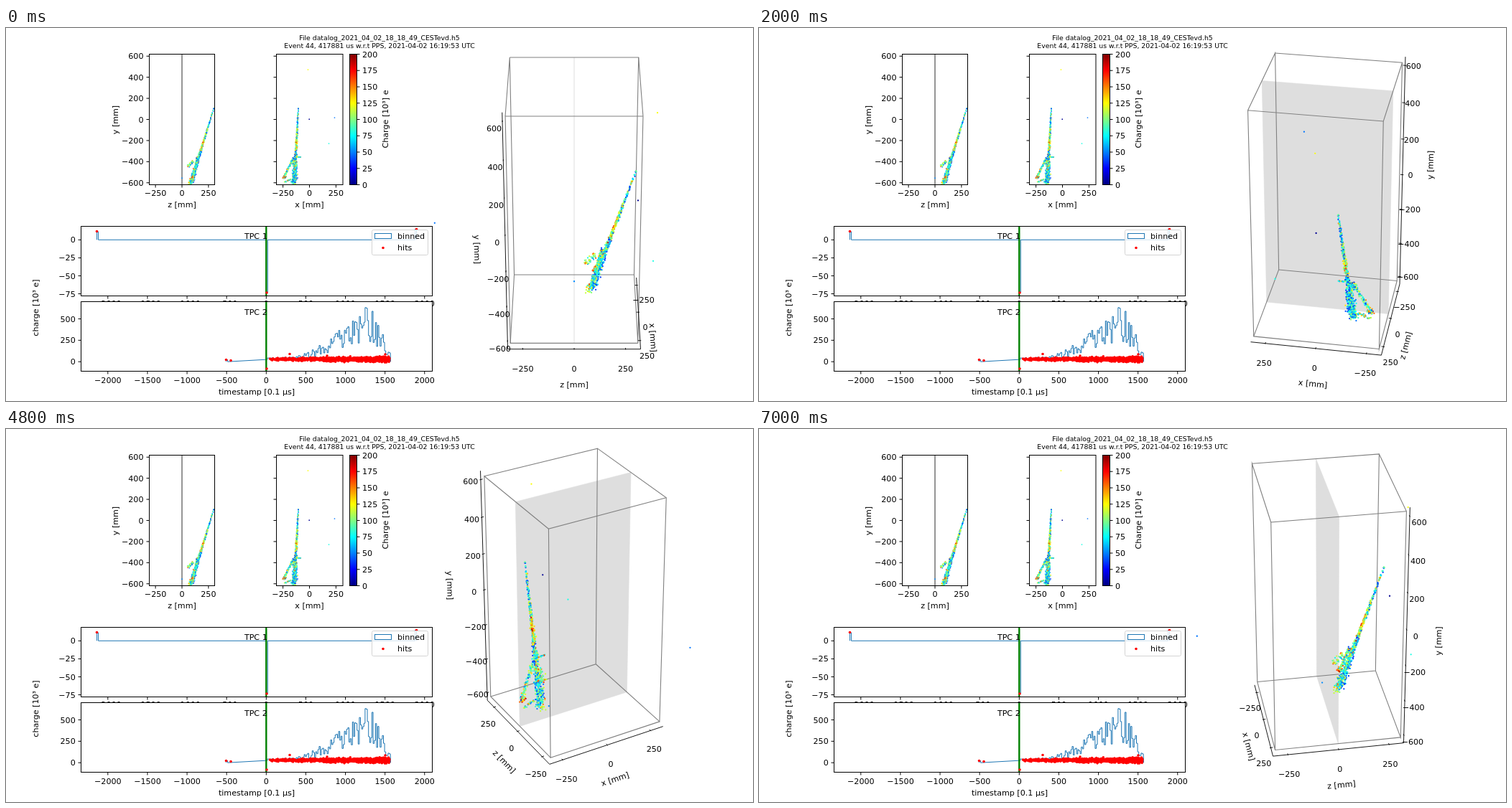
These frames come from a looping animation (1040 px wide and 520 px high, 7200 ms). An HTML page with a canvas:

```html
<!DOCTYPE html>
<html lang="en">
<head>
<meta charset="utf-8">
<title>Event display</title>
<style>
html, body { margin: 0; width: 100%; height: 100%; overflow: hidden; background: #fff; }
canvas { display: block; }
</style>
</head>
<body>
<canvas id="stage" width="1040" height="520"></canvas>
<script>
const stage = document.getElementById('stage');
let c = stage.getContext('2d');
const BLUE = '#1f77b4', GREY = '#808080';

let seed = 44;
const rnd = () => {
  seed = (Math.imul(seed, 1664525) + 1013904223) >>> 0;
  return seed / 4294967296;
};
const gauss = () => (rnd() + rnd() + rnd() - 1.5) * 2;
const clamp = (v, lo, hi) => Math.max(lo, Math.min(hi, v));
const mix = (a, b, u) => a + (b - a) * u;
const bell = (v, mid, width) => Math.exp(-(((v - mid) / width) ** 2));

function jet(t) {
  const ch = k => Math.round(255 * clamp(1.5 - Math.abs(4 * t - k), 0, 1));
  return `rgb(${ch(3)},${ch(2)},${ch(1)})`;
}

// Drawing helpers
function path(pts, color, width = 1, fill) {
  c.beginPath();
  pts.forEach(p => c.lineTo(p[0], p[1]));
  if (fill) { c.closePath(); c.fillStyle = fill; c.fill(); }
  c.strokeStyle = color;
  c.lineWidth = width;
  c.stroke();
}
const line = (x1, y1, x2, y2, color = '#000', width = 1) => path([[x1, y1], [x2, y2]], color, width);
function frame(x, y, w, h, color = '#000') {
  c.strokeStyle = color;
  c.lineWidth = 1;
  c.strokeRect(x, y, w, h);
}
function dot(x, y, r, color) {
  c.fillStyle = color;
  c.beginPath();
  c.arc(x, y, r, 0, 7);
  c.fill();
}
function text(s, x, y, align = 'center', size = 11.11, deg = 0) {
  c.save();
  c.translate(x, y);
  c.rotate(-deg * Math.PI / 180);
  c.font = `${size}px "DejaVu Sans", sans-serif`;
  c.textAlign = align;
  c.fillStyle = '#000';
  c.fillText(s, 0, size * 0.365);
  c.restore();
}
const upright = (s, x, y) => text(s, x, y, 'center', 11.11, 90);
const num = v => String(v).replace('-', '\u2212');
function range(from, to, step, fn) {
  for (let v = from; v <= to; v += step) fn(v);
}

// Hits in mm: [x, z, y], each with a colour for its charge
const hits = [];
const addHit = (x, z, y, charge) => hits.push({ pos: [x, z, y], color: jet(charge) });

function strand(from, to, count, spread, charge, growth = 1) {
  for (let i = 0; i < count; i++) {
    const u = rnd() ** growth;
    const s = typeof spread === 'function' ? spread(u) : spread;
    const [x, z, y] = from.map((v, m) => mix(v, to[m], u));
    const side = gauss();
    const q = charge + .22 * bell(u, .46, .1) * (growth < 1) - side * .06 + gauss() * .15;
    addHit(x + gauss() * s, z + side * s * .8, Math.max(-618, y + gauss() * s * .6), clamp(q, .19, .97));
  }
}
strand([-103, 307, 128], [-146, 80, -612], 680, u => 2 + 11 * u * u, .38, .55);
strand([-150, 143, -365], [-245, 106, -555], 90, 5, .45);
strand([-225, 108, -540], [-240, 104, -555], 26, 8, .65);
strand([-232, 100, -592], [-185, 95, -570], 22, 5, .5);
strand([-128, 145, -355], [-84, 150, -357], 16, 2, .55);
strand([-140, 105, -395], [-140, 62, -440], 36, 9, .5);
addHit(-14, 392, 472, .62);
addHit(-2, 309, 2, .02);
addHit(237, -657, 17, .24);
addHit(183, 380, -228, .4);
addHit(-145, 0, -555, .26);

function sidePanel(x, w, mid, axis, label) {
  c.save();
  c.beginPath();
  c.rect(x, 36.5, w, 182);
  c.clip();
  if (axis) line(mid, 36, mid, 219, GREY, 1.67);
  for (const { pos, color } of hits) dot(mid + pos[axis] * .1476, 127.5 - pos[2] * .1471, .85, color);
  c.restore();
  frame(x, 36.5, w, 182);
  range(-600, 600, 200, v => {
    const y = 127.5 - v * .1471;
    line(x - 4, y, x, y);
    if (axis) text(num(v), x - 8, y, 'right');
  });
  range(-250, 250, 250, v => {
    const tx = mid + v * .1476;
    line(tx, 218.5, tx, 222.5);
    text(num(v), tx, 230.3);
  });
  text(label, mid, 246);
}

function colorBar() {
  const g = c.createLinearGradient(0, 218.5, 0, 36.5);
  range(0, 32, 1, i => g.addColorStop(i / 32, jet(i / 32)));
  c.fillStyle = g;
  c.fillRect(478.5, 36.5, 10, 182);
  frame(478.5, 36.5, 10, 182);
  range(0, 200, 25, v => {
    const y = 218.5 - v * .91;
    line(488.5, y, 492.5, y);
    text(num(v), 496, y, 'left');
  });
  upright('Charge [10\u00b3] e', 528, 127);
}

// Charge against time: one plot above the other
const LEFT = 104.5, WIDTH = 489, HEIGHT = 97, ZERO = 362.3;
const redDot = (x, y) => dot(x, y, 1.8, '#f00');

function timeTicks(y, labelY) {
  range(-2000, 2000, 500, v => {
    const x = ZERO + v * .11025;
    line(x, y, x, y + 4);
    text(num(v), x, labelY);
  });
}
function chargeTicks(from, to, step, y0, scale) {
  range(from, to, step, v => {
    const y = y0 - v * scale;
    line(LEFT - 4, y, LEFT, y);
    text(num(v), LEFT - 7.8, y, 'right');
  });
}
const bin = (x, w, y, base) => [[x, base], [x, y], [x + w, y], [x + w, base]];

function upperPlot() {
  const base = 295.3;
  timeTicks(373.5, 384);
  chargeTicks(-75, 0, 25, base, 1.003);
  path([...bin(126.5, 2, 284, base), ...bin(ZERO, 2, 368.5, base), ...bin(569.5, 2, 280.5, base)], BLUE);
  line(ZERO, 277, ZERO, 373, '#008000', 2.4);
  redDot(126.5, 283.5);
  redDot(363, 369);
  redDot(571.5, 280.5);
  frame(LEFT, 276.5, WIDTH, HEIGHT);
  text('TPC 1', 347.8, 289.7);
}

function legend() {
  c.beginPath();
  c.roundRect(509.5, 281.5, 78, 35, 2.2);
  c.fillStyle = 'rgba(255,255,255,.8)';
  c.strokeStyle = '#d4d4d4';
  c.fill();
  c.stroke();
  frame(513.5, 286.5, 23, 7, BLUE);
  text('binned', 545, 290.3, 'left');
  redDot(525, 306.5);
  text('hits', 545, 306.3, 'left');
}

function lowerPlot() {
  const base = 465.2;
  c.fillStyle = '#fff';
  c.fillRect(LEFT, 381.5, WIDTH, HEIGHT);
  timeTicks(478.5, 490.6);
  chargeTicks(0, 500, 250, base, .1195);
  const steps = bin(306.5, 2, 462.5, base);
  range(ZERO, 534, 1.6, x => {
    const level = 5 + 72 * bell(x, 504, x < 504 ? 58 : 23);
    const y = base - level * (.35 + .65 * rnd());
    steps.push([x, y], [x + 1.6, y]);
  });
  steps.push([535.5, base]);
  path(steps, BLUE);
  line(ZERO, 382, ZERO, 478, '#008000', 2.4);
  redDot(306.5, 462.5);
  redDot(313, 463.5);
  redDot(363, 475);
  redDot(395, 454.5);
  redDot(447, 457);
  redDot(528, 455);
  for (let i = 0; i < 700; i++) {
    const u = rnd() ** .6;
    redDot(365 + 169 * u, 461.8 + gauss() * (.8 + u));
  }
  frame(LEFT, 381.5, WIDTH, HEIGHT);
  text('TPC 2', 347.8, 395.7);
  text('timestamp [0.1 \u03bcs]', 349, 507.3);
  upright('charge [10\u00b3 e]', 41, 390);
}

function drawStatic() {
  c.fillStyle = '#fff';
  c.fillRect(0, 0, 1040, 520);
  text('File datalog_2021_04_02_18_18_49_CESTevd.h5', 520, 14, 'center', 9.32);
  text('Event 44, 417881 us w.r.t PPS, 2021-04-02 16:19:53 UTC', 520, 25, 'center', 9.32);
  sidePanel(199.5, 91, 245, 1, 'z [mm]');
  sidePanel(376.5, 92.5, 422.5, 0, 'x [mm]');
  upright('y [mm]', 152, 128);
  colorBar();
  upperPlot();
  legend();
  lowerPlot();
}

// Rotating view; points are [x, z, y] with y upwards, seen from 30 degrees above
const half = [310, 310, 620];
const delta = half.map(v => v / 6);
const names = ['x [mm]', 'z [mm]', 'y [mm]'];
let cos = 1, sin = 0;

function project([x, z, y]) {
  const k = .37345 / 310;
  const side = (z * cos - x * sin) * k, near = (x * cos + z * sin) * k, up = y * k;
  const depth = 10 - near * .866 - up * .5;
  return [791 + 2390 * side / depth, 241.2 - 2390 * (up * .866 - near * .5) / depth, depth];
}

function drawAxis(i) {
  const vertical = i === 2;
  const high = [cos < -1e-9, sin < -1e-9, false];
  const edge = half.map((v, m) => (high[m] ? 1 : -1) * v * 25 / 24);
  const across = i === 0 ? 1 : 0;
  edge[across] *= -1;
  const at = (v, shift = 0) => {
    const p = edge.slice();
    p[i] = v;
    p[across] += shift;
    return p;
  };
  const outward = (v, k) => project(at(v).map((w, m) => m === i ? w : w + Math.sign(w) * k * delta[m]));

  const a = project(edge), b = project(at(-edge[i]));
  path([a, b], '#000', .9);
  const top = vertical ? 600 : 250;
  const unit = (high[across] ? 1 : -1) * delta[across];
  range(-top, top, vertical ? 200 : 250, v => {
    path([project(at(v, .2 * unit)), project(at(v, -.1 * unit))], '#000', .9);
    const p = outward(v, .69);
    text(num(v), p[0], p[1] + 4.4);
  });
  let deg = (Math.atan2(a[1] - b[1], b[0] - a[0]) * 180 / Math.PI + 180) % 180;
  if (deg > 90) deg -= 180;
  const p = outward(0, vertical ? 2.4 : 1.5);
  text(names[i], p[0], p[1], 'center', 11.11, deg);
}

function drawView(angle) {
  cos = Math.cos(angle);
  sin = Math.sin(angle);
  const corners = [[-1, -1], [1, -1], [1, 1], [-1, 1]];
  const plane = corners.map(([x, y]) => project([x * 310, 0, y * 620]));
  path(plane, '#dedede', .6, '#dedede');
  const [low, high] = [-620, 620].map(y => corners.map(([x, z]) => project([x * 310, z * 310, y])));
  for (let i = 0; i < 4; i++) {
    const next = (i + 1) % 4;
    path([low[next], low[i], high[i], high[next]], GREY, 1.1);
  }
  names.forEach((_, i) => drawAxis(i));
  hits.map(h => [...project(h.pos), h.color])
    .sort((a, b) => b[2] - a[2])
    .forEach(([x, y, , color]) => dot(x, y, 1.15, color));
}

const view = c;
const backdrop = document.createElement('canvas');
backdrop.width = 1040;
backdrop.height = 520;
c = backdrop.getContext('2d');
drawStatic();
c = view;

let shown = -1;
function tick() {
  const step = Math.floor(performance.now() % 7200 / 200);
  if (step !== shown) {
    shown = step;
    c.drawImage(backdrop, 0, 0);
    drawView(step * Math.PI / 18);
  }
  requestAnimationFrame(tick);
}
tick();
</script>
</body>
</html>
```
